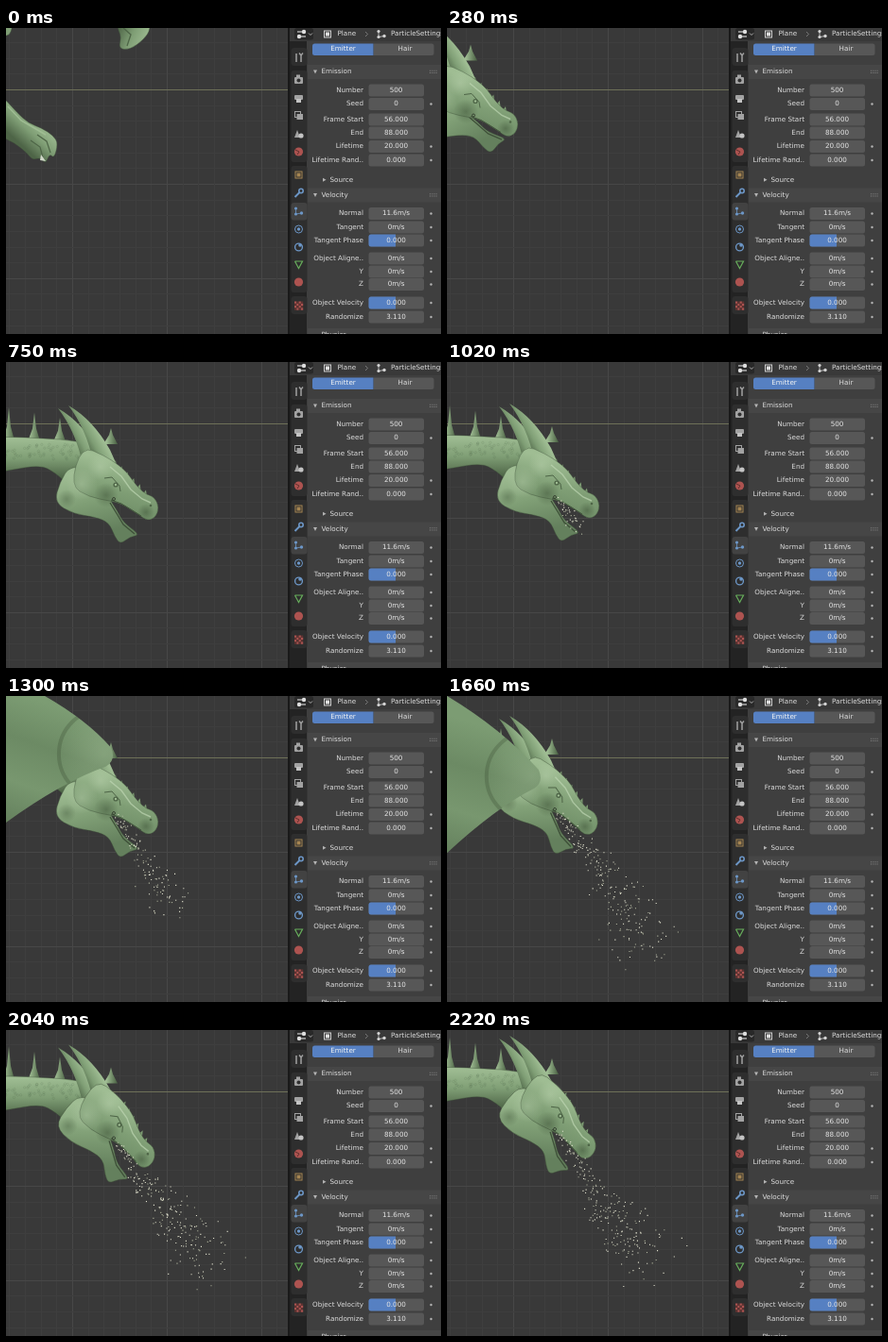
These frames come from a looping animation (460x324 px, 2.28 s). An HTML page with a canvas:

```html
<!DOCTYPE html>
<html>
<head>
<meta charset="utf-8">
<style>
html, body { margin: 0; width: 460px; height: 324px; overflow: hidden; background: #393939; }
canvas { display: block; }
</style>
</head>
<body>
<canvas id="stage" width="460" height="324"></canvas>
<script>
const LOOP = 2280, STEP = 92;
const stage = document.getElementById('stage');
let c = stage.getContext('2d');

// ---------- helpers ----------
function box(x, y, w, h, color, r = 0) {
  c.fillStyle = color;
  c.beginPath();
  c.roundRect(x, y, w, h, r);
  c.fill();
}
function frame(x, y, size, color) {
  c.strokeStyle = color;
  c.lineWidth = 1;
  c.strokeRect(x, y, size, size);
}
function disc(x, y, r, color) {
  c.fillStyle = color;
  c.beginPath();
  c.arc(x, y, r, 0, 7);
  c.fill();
}
function ring(x, y, r, color, w = 1) {
  c.strokeStyle = color;
  c.lineWidth = w;
  c.beginPath();
  c.arc(x, y, r, 0, 7);
  c.stroke();
}
function trace(p) {
  c.beginPath();
  for (let i = 0; i < p.length; i += 2) c.lineTo(p[i], p[i + 1]);
}
function line(color, w, ...p) {
  c.strokeStyle = color;
  c.lineWidth = w;
  trace(p);
  c.stroke();
}
function poly(color, ...p) {
  c.fillStyle = color;
  trace(p);
  c.fill();
}
function text(s, x, y, align = 'left', color = '#dcdcdc') {
  c.font = '7.2px "DejaVu Sans", sans-serif';
  c.textAlign = align;
  c.textBaseline = 'middle';
  c.fillStyle = color;
  c.fillText(s, x, y);
}
function shade(x0, y0, x1, y1, ...colors) {
  const g = c.createLinearGradient(x0, y0, x1, y1);
  colors.forEach((col, i) => g.addColorStop(i / (colors.length - 1), col));
  return g;
}
// soft round patch of light or shadow
function glow(x, y, r, rgb, alpha) {
  const g = c.createRadialGradient(x, y, 0, x, y, r);
  g.addColorStop(0, `rgba(${rgb},${alpha})`);
  g.addColorStop(1, `rgba(${rgb},0)`);
  disc(x, y, r, g);
}
// closed outline, rounded through the midpoints of its corners
function blob(fill, ...p) {
  const n = p.length / 2, X = i => p[i % n * 2], Y = i => p[i % n * 2 + 1];
  c.beginPath();
  for (let i = 0; i < n; i++) {
    if (!i) c.moveTo((X(0) + X(n - 1)) / 2, (Y(0) + Y(n - 1)) / 2);
    c.quadraticCurveTo(X(i), Y(i), (X(i) + X(i + 1)) / 2, (Y(i) + Y(i + 1)) / 2);
  }
  c.closePath();
  c.fillStyle = fill;
  c.fill();
  c.strokeStyle = 'rgba(62,80,56,.7)';
  c.lineWidth = 0.6;
  c.stroke();
}
function rand(n) {
  const v = Math.sin(n * 127.1 + 3.7) * 43758.5453;
  return v - Math.floor(v);
}
function ease(u) {
  u = Math.max(0, Math.min(1, u));
  return u * u * (3 - 2 * u);
}

// ---------- interface ----------
function particleIcon(x, y, color) {
  disc(x - 3, y - 3, 1.6, color);
  disc(x - 3, y + 3, 1.6, color);
  disc(x + 3, y + 2, 1.7, color);
  line(color, 0.8, x - 3, y - 3, x - 3, y + 3, x + 3, y + 2);
}
function tabs() {
  const grey = '#a2a2a2', blue = '#6c96c6', red = '#ad5350', orange = '#a58552', green = '#67ad5b', x = 309.5;
  box(300, 14, 18, 310, '#232323');
  for (const [y, h] of [[21, 19], [45, 97], [146, 134], [284, 19]]) box(301.5, y, 17, h, '#2e2e2e', 3);
  box(301.5, 185, 17, 18.5, '#424242', 3);

  // tool, render, output, layers, scene, world
  line(grey, 1.5, 307, 27, 307, 36);
  line(grey, 1.5, 312, 36, 312, 29, 310, 26.5);
  line(grey, 1.3, 312, 29, 314, 26.5);
  box(305, 52, 9, 7, grey, 1);
  box(307, 49.5, 4, 3, grey);
  disc(x, 55.5, 2, '#303030');
  box(305, 71, 9, 5, grey, 1);
  box(307, 75, 5, 4, '#c4c4c4');
  frame(305.5, 88.5, 6, grey);
  box(307.5, 91, 6.5, 6, grey);
  poly(grey, 305, 116, 308, 108, 311, 116);
  disc(312, 114, 2.6, '#c4c4c4');
  disc(x, 131, 4.6, red);
  line('#5f2f2d', 1, 306, 129, 310, 131, 308, 134);

  // object, modifiers, particles, physics, constraints, mesh, material, texture
  frame(306, 152, 7, orange);
  box(307.5, 153.5, 4, 4, orange);
  line(blue, 2, 305.5, 179, 310.5, 174);
  ring(312, 172.5, 2.2, blue, 1.6);
  particleIcon(x, 194, blue);
  ring(x, 213, 4, blue);
  disc(x, 213, 1.7, blue);
  ring(x, 232, 3.9, blue, 1.4);
  disc(311, 230, 1.8, blue);
  line(green, 1.2, 305.5, 247, 313.5, 247, 309.5, 254.5, 305.5, 247);
  disc(x, 269, 4.6, red);
  for (let i = 0; i < 16; i++) {
    const row = i >> 2;
    box(305 + i % 4 * 2.3, 289.5 + row * 2.3, 2.3, 2.3, (i + row) % 2 ? '#5f3230' : red);
  }
}
function section(name, y) {
  box(319, y - 7.5, 141, 15, '#464646');
  poly('#b4b4b4', 325, y - 2, 329, y - 2, 327, y + 2);
  text(name, 333.5, y);
  for (let i = 0; i < 8; i++) box(448 + i % 4 * 2.2, y - 1.7 + (i >> 2) * 2.2, 1, 1, '#858585');
}
function field(name, value, y, dot = true, slider = false) {
  text(name, 378, y, 'right');
  box(383.5, y - 6.5, 58.5, 13, '#575757', 2.5);
  if (slider) box(383.5, y - 6.5, 28.5, 13, '#5680c2', [2.5, 0, 0, 2.5]);
  text(value, 412.5, y, 'center', '#e6e6e6');
  if (dot) disc(449.5, y, 1.2, '#b4b4b4');
}
function panel() {
  box(298, 0, 2.5, 324, '#191919');
  box(300, 0, 160, 324, '#3f3f3f');
  box(300, 0, 160, 14, '#393939');
  tabs();

  box(305, 0, 20, 12.5, '#292929', 2.5);
  line('#c4c4c4', 1.3, 308, 4, 317, 4);
  line('#c4c4c4', 1.3, 308, 9, 317, 9);
  disc(315, 4, 2.2, '#dedede');
  disc(310, 9, 2.2, '#dedede');
  line('#bbb', 0.9, 320, 5.5, 322, 7.5, 324, 5.5);
  frame(336.5, 3, 7, '#d0d0d0');
  box(338, 4.5, 4, 4, '#dedede');
  text('Plane', 350.5, 6.5);
  line('#8a8a8a', 0.8, 380, 4, 382.5, 6.5, 380, 9);
  particleIcon(397, 6.5, '#d6d6d6');
  text('ParticleSettings', 407, 6.5);

  box(324, 16.5, 64.5, 12.5, '#5680c2', [2.5, 0, 0, 2.5]);
  box(389, 16.5, 63.5, 12.5, '#575757', [0, 2.5, 2.5, 0]);
  text('Emitter', 356.5, 22.5, 'center', '#f4f4f4');
  text('Hair', 422, 22.5, 'center');

  section('Emission', 46.5);
  field('Number', '500', 66, false);
  field('Seed', '0', 80.5);
  field('Frame Start', '56.000', 97, false);
  field('End', '88.000', 111, false);
  field('Lifetime', '20.000', 125.5);
  field('Lifetime Rand..', '0.000', 140);
  poly('#b4b4b4', 335, 158.7, 335, 162.7, 338.5, 160.7);
  text('Source', 342.5, 161);

  section('Velocity', 177);
  field('Normal', '11.6m/s', 196.5);
  field('Tangent', '0m/s', 211);
  field('Tangent Phase', '0.000', 225, true, true);
  field('Object Aligne..', '0m/s', 244);
  field('Y', '0m/s', 258);
  field('Z', '0m/s', 271.5);
  field('Object Velocity', '0.000', 291, true, true);
  field('Randomize', '3.110', 306);
  box(319, 318, 141, 6, '#464646');
  text('Physics', 333.5, 325.5);
}
function grid() {
  box(0, 0, 298, 324, '#393939');
  for (let i = -4; i < 16; i++) {
    const color = i % 6 ? '#3e3e3e' : '#474747', p = Math.round(65 + i * 16.65) + 0.5;
    line(color, 1, p + 5, 0, p + 5, 324);
    line(color, 1, 0, p, 298, p);
  }
  line('#6e7058', 1, 0, 65.5, 298, 65.5);
}

// ---------- creature ----------
const LIGHT = '#9fbd93', MID = '#7f9e75', DARK = '#4e6547';
const HIGH = '190,214,178', LOW = '48,66,42';
const heights = [[1, 70], [5, 115], [8, 145], [11, 143], [14, 124], [18, 120], [20, 124], [24, 105]];

// mouth position, head tilt and jaw opening at a step
function pose(s) {
  const i = Math.max(1, heights.findIndex(k => s <= k[0]));
  const [a, b] = [heights[i - 1], heights[i]];
  return {
    x: Math.min(114, 114 + 43 * (s - 5)),
    y: a[1] + (b[1] - a[1]) * ease((s - a[0]) / (b[0] - a[0])),
    tilt: 0.26 * ease((s - 15) / 6),
    jaw: ease((s - 5) / 3)
  };
}
function horn(dx, dy) {
  c.save();
  c.translate(dx, dy);
  c.beginPath();
  c.moveTo(-48, -99);
  c.quadraticCurveTo(-22, -84, -4, -52);
  c.lineTo(4, -34);
  c.lineTo(-22, -40);
  c.quadraticCurveTo(-29, -74, -48, -99);
  c.fillStyle = shade(-36, -64, -18, -74, DARK, MID, LIGHT);
  c.fill();
  c.restore();
}
function neck() {
  for (let i = 0; i < 5; i++) {
    const x = -111 + i * 27, h = 34 - i * 5.5;
    poly(shade(x - 5, 0, x + 6, 0, LIGHT, DARK),
      x - 8, -58, x - 2, -63 - h * 0.4, x, -63 - h, x + 2, -63 - h * 0.4, x + 7, -58);
  }
  blob(shade(0, -64, 0, -22, LIGHT, MID, DARK),
    -170, -64, -112, -66, -74, -64, -40, -62, -10, -52, -10, -20, -45, -12, -62, -28, -78, -36, -112, -30, -170, -20);
  for (let i = 0; i < 60; i++) {
    ring(-116 + rand(i) * 80, -58 + rand(i + 80) * 16, 1.2, `rgba(${LOW},.16)`, 0.6);
  }
}
function jawbone(open) {
  c.save();
  c.translate(-12, 5);
  c.rotate((open - 1) * 0.3);
  c.translate(12, -5);
  blob(shade(-30, -30, -14, 36, LIGHT, MID, '#64805d'),
    -6, -2, 4, 13, 10, 25, 28, 38, 17, 40, 7, 48, 1, 40, -5, 25, -20, 19, -42, 16, -63, 4, -57, -18, -46, -36, -14, -30);
  line('#3f5139', 1.4, -4, 4, 4, 17, 10, 27, 22, 37);
  c.restore();
}
function skull() {
  for (let i = 0; i < 6; i++) {
    const x = -2 + i * 6.4, y = -33 + i * 6.3;
    poly(MID, x - 3, y + 2, x + 4, y - 8, x + 6, y + 6);
  }
  blob(shade(0, -40, -14, 16, LIGHT, MID, '#6d8b65'),
    -34, -56, -10, -46, 5, -36, 14, -28, 21, -18, 27, -11, 34, -5, 43, -2, 48, 9, 44, 20, 35, 23, 27, 17, 17, 11, 8, 5, -4, 2, -26, -2, -46, -14);
  glow(-34, -16, 17, HIGH, 0.4);
  glow(-14, -34, 14, HIGH, 0.4);
  glow(-8, -4, 13, LOW, 0.4);
  glow(-50, 0, 10, LOW, 0.3);
  glow(34, 14, 9, LOW, 0.4);
  line(`rgba(${HIGH},.7)`, 1.4, -4, -34, 8, -24, 18, -10, 30, 0, 39, 4);
  line(DARK, 1, -10, -22, -2, -23, 6, -14, 7, -8);
  disc(2, -15, 2.6, DARK);
  disc(2, -15, 1.2, LIGHT);
  line('#41543b', 1, -3, 1, 8, 5, 18, 11, 29, 18);
  disc(39, 7, 1.3, DARK);
  ring(0, 0, 1.5, '#2b3328', 0.8);
}
function dragon(s) {
  if (s < 1) return;
  const p = pose(s);
  c.save();
  c.translate(p.x, p.y);
  neck();
  horn(-11, 3);
  horn(0, 0);
  c.rotate(p.tilt);
  jawbone(p.jaw);
  skull();
  c.restore();
}
function wing(s) {
  // one downstroke: rises past zero, peaks near 1 and swings back
  const w = 1.07 - ((s - 16.6) / 4.4) ** 2;
  if (w < -0.4) return;
  const top = 160 - 165 * w, x = 155 - 57 * w, y = 95 * w - 5, low = 38 + 134 * w;
  c.beginPath();
  c.moveTo(-5, -90);
  c.lineTo(top - 25, -90);
  c.lineTo(top, 0);
  c.quadraticCurveTo((top + x) / 2 + 8, y * 0.4, x - 3, y - 9);
  c.quadraticCurveTo(x + 3, y + 4, x - 8, y + 11);
  c.quadraticCurveTo(x * 0.5, y + (low - y) * 0.4, -5, low + 3);
  c.fillStyle = shade(0, low, x * 0.4, y - 55, '#64805d', '#78976f', '#6c8a64', '#7c9c73');
  c.fill();
  c.save();
  c.clip();
  glow(x - 10, y - 2, 48, HIGH, 0.25);
  c.strokeStyle = `rgba(${LOW},.25)`;
  c.lineWidth = 4;
  c.stroke();
  c.restore();
}
function claws(s) {
  if (s > 3) return;
  c.save();
  c.translate(-s * 24, -s * 32);
  blob(shade(10, 118, 32, 94, DARK, MID, LIGHT),
    -30, 55, -4, 72, 12, 90, 24, 101, 38, 106, 50, 114, 55, 122, 51, 138, 46, 133, 42, 144, 36, 137, 28, 140, 22, 132, 8, 121, -4, 116, -30, 95);
  line(DARK, 1.2, 33, 113, 43, 120, 47, 132);
  line(DARK, 1.2, 26, 119, 36, 126, 39, 137);
  line(LIGHT, 1.5, 2, 83, 16, 98, 30, 106, 42, 113);
  poly('#cfd8c8', 37, 134, 42, 141, 36, 140);
  blob(MID, -8, -8, 7, -6, 5, 7, -4, 9);
  blob(shade(118, 0, 150, 14, DARK, MID, LIGHT), 116, -20, 118, 1, 122, 9, 119, 22, 131, 23, 146, 12, 153, 1, 152, -20);
  line(DARK, 1.3, 124, 0, 132, 7, 128, 19);
  c.restore();
}

// ---------- breath ----------
function breath(s) {
  const life = 8.6;
  for (let i = 0; i < 430; i++) {
    const birth = 9.5 + i / 27, age = s - birth;
    if (age < 0) break;
    if (age > life) continue;
    const { x, y } = pose(birth);
    const far = (31 * age - 1.2 * age * age) * (0.66 + 0.34 * rand(i));
    const dir = 0.89 + (rand(i + 500) + rand(i + 900) - 1) * 0.29;
    const px = x + 4 + Math.cos(dir) * far + (rand(i + 1300) - 0.5) * 8;
    const py = y + 4 + Math.sin(dir) * far + (rand(i + 1700) - 0.5) * 8;
    box(px - 0.55, py - 0.55, 1.1, 1.1, rand(i + 2100) < 0.4 ? '#aeb29c' : '#e2e2cf');
  }
}

// ---------- playback ----------
const still = document.createElement('canvas');
still.width = 460;
still.height = 324;
const live = c;
c = still.getContext('2d');
grid();
panel();
c = live;

function draw(s) {
  c.drawImage(still, 0, 0);
  c.save();
  c.beginPath();
  c.rect(0, 0, 298, 324);
  c.clip();
  claws(s);
  dragon(s);
  wing(s);
  breath(s);
  c.restore();
}
const begin = performance.now();
function tick() {
  draw(Math.floor((performance.now() - begin) % LOOP / STEP));
  requestAnimationFrame(tick);
}
tick();
</script>
</body>
</html>
```
